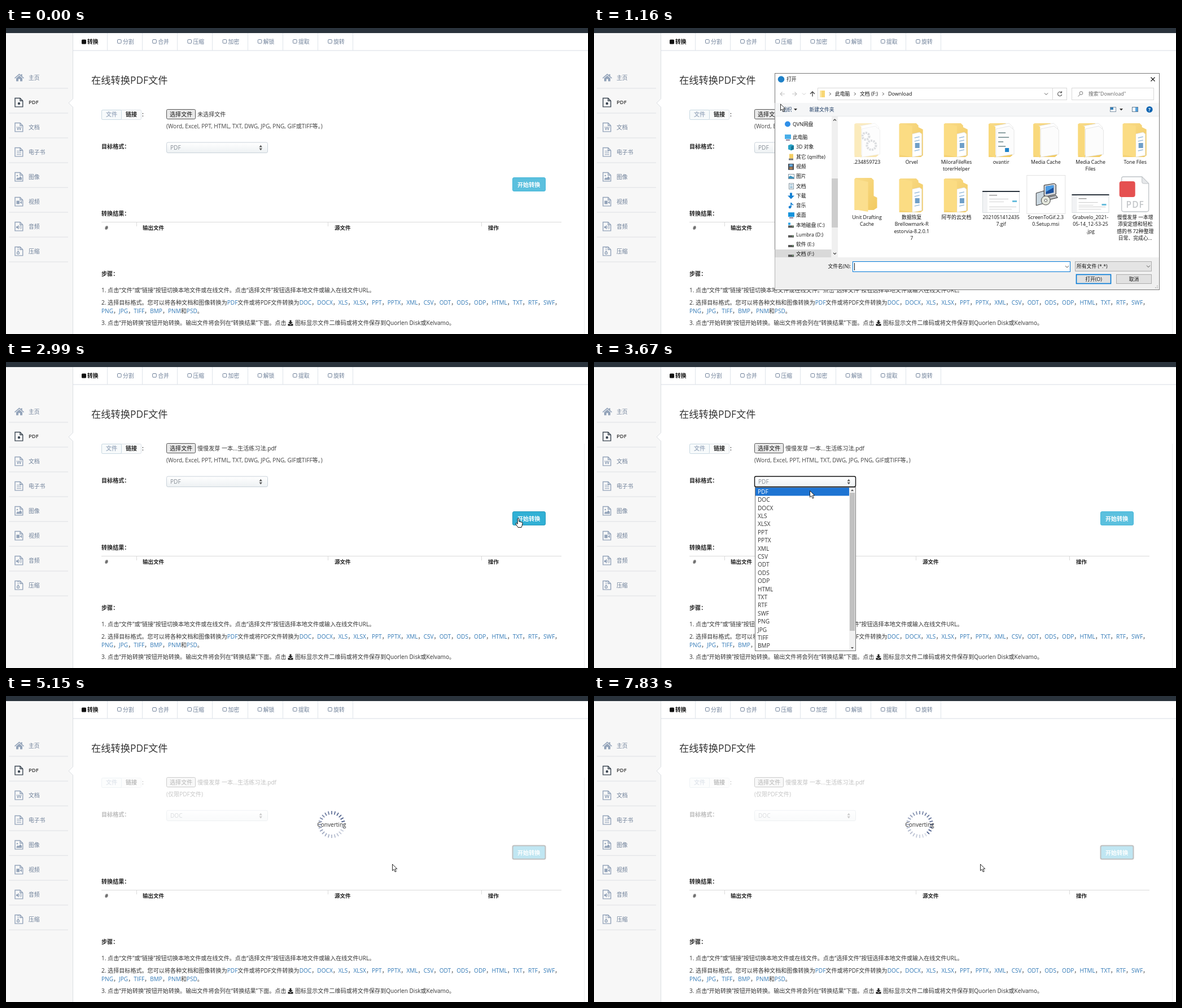
An HTML page for the animation above (7.99 s loop, 1031 by 543 pixels).

```html
<!DOCTYPE html>
<html lang="zh-CN">
<head>
<meta charset="utf-8">
<title>在线转换PDF文件</title>
<style>
html, body { margin: 0; width: 100%; height: 100%; overflow: hidden; background: #fff; }
svg { display: block; width: 1031px; height: 543px; }
text { font-family: 'Open Sans', 'Noto Sans CJK SC', 'Noto Sans CJK', sans-serif; white-space: pre; }
</style>
</head>
<body>
<svg id="stage" viewBox="0 0 1031 543"></svg>
<script>
const BODY = 10.08, SMALL = 8.8;
const stage = document.getElementById('stage');

const attrs = o => Object.entries(o).map(([k, v]) => ` ${k}="${v}"`).join('');
const rect = (x, y, w, h, fill, o = {}) =>
  `<rect x="${x}" y="${y}" width="${w}" height="${h}" fill="${fill}"${attrs(o)}/>`;
const box = (x, y, w, h, fill, stroke, o = {}) => rect(x + .5, y + .5, w - 1, h - 1, fill, { stroke, ...o });
const path = (d, fill, o = {}) => `<path d="${d}" fill="${fill}"${attrs(o)}/>`;
const line = (d, stroke, width = 1, o = {}) => path(d, 'none', { stroke, 'stroke-width': width, ...o });
const circle = (x, y, r, fill, o = {}) => `<circle cx="${x}" cy="${y}" r="${r}" fill="${fill}"${attrs(o)}/>`;
const group = (body, o = {}) => `<g${attrs(o)}>${body}</g>`;
const at = (x, y, body) => group(body, { transform: `translate(${x} ${y})` });
// y is the optical middle of the line
const text = (x, y, s, fill = '#333', size = BODY, o = {}) =>
  `<text x="${x}" y="${y + size * .36}" font-size="${size}" fill="${fill}"${attrs(o)}>${s}</text>`;
const bold = (x, y, s, fill = '#222', size = BODY) => text(x, y, s, fill, size, { 'font-weight': 600 });
const small = (x, y, s, fill = '#111', o = {}) => text(x, y, s, fill, SMALL, o);
const middle = { 'text-anchor': 'middle' };
const chevron = (x, y, c = '#555') => line(`M${x - 3} ${y - 1.5}l3 3 3-3`, c);
const caret = (x, y) => path(`M${x - 3} ${y - 1.5}h6l-3 3.5z`, '#333');

const book = { label: ['慢慢发芽 一本增', '添安定感和轻松', '感的书 72种整理', '日常、完成心...'],
  file: '慢慢发芽 一本增添安定感和轻松感的书 72种整理日常、完成心愿的生活练习法.pdf',
  short: '慢慢发芽 一本...生活练习法.pdf' };
const formats = 'DOC DOCX XLS XLSX PPT PPTX XML CSV ODT ODS ODP HTML TXT RTF SWF PNG JPG TIFF BMP PNM PSD'.split(' ');

function sidebar() {
  const glyphs = [
    '', c => circle(23, 2, 2.2, c),
    c => text(23, 1.5, 'W', c, 9, { ...middle, 'font-weight': 700 }),
    c => line('M19 -1.5h8M19 1.5h8M19 4.5h8', c, 1.2),
    c => path('M18.5 5.5v-2l2.5-2.5 1.5 1.5 3-3.5 2.5 3v3.5z', c) + circle(20, -2, 1.3, c),
    c => rect(18.5, -1.5, 5.5, 6, c) + path('M24.5 1.5l3.5-3v6z', c),
    c => path('M18 0h2l2.5-2.5v8L20 3h-2z', c) + line('M24 -.5q1.5 2 0 4M26 -2q2.5 3.5 0 7', c),
    c => line('M21.5 -7v8', c, 2, { 'stroke-dasharray': '1.5 1.5' }) + circle(21.5, 3.2, 2, 'none', { stroke: c, 'stroke-width': 1.4 })
  ];
  const names = ['主页', 'PDF', '文档', '电子书', '图像', '视频', '音频', '压缩'];
  const items = names.map((name, i) => {
    const active = i === 1, c = active ? '#3b4652' : '#94a4ba';
    const icon = i
      ? line('M16 -7.5h9l4.7 4.7v10.7H16zM25 -7.5v4.7h4.7', c, 1.4) + glyphs[i](c)
      : path('M15 .5L23.5 -7l3 2.7V-6h2.2v3.7L32 .5l-1 1.2-7.5-6.5L16 1.7z', c) + path('M18 1.2l5.5-4.7 5.5 4.7V6.5h-4V2.5h-3v4h-4z', c);
    return at(0, 88 + 44 * i, icon +
      (active ? bold(40, 0, name, '#333', 9.4) : text(40, 0, name, '#6d7f98', 9.8)) +
      rect(5, 18.5, 105, 1, '#dde0e4'));
  });
  return rect(0, 9, 118, 534, '#f7f7f7') + rect(118, 9, 1, 534, '#dcdfe3') + items.join('') +
    path('M120 124.5L111 133l9 8.5z', '#fff') + line('M118.5 125.5L111 133l7.5 7.5', '#dcdfe3');
}

function tabs() {
  const names = ['转换', '分割', '合并', '压缩', '加密', '解锁', '提取', '旋转'];
  return rect(119, 39.5, 912, 1, '#d8dee5') + names.map((name, i) => {
    const x = i ? 197 + 62.2 * (i - 1) : 134;
    const icon = i ? rect(x + .5, 20.5, 6.6, 6.6, 'none', { rx: 1.3, stroke: '#6d7f98' }) : rect(x, 20.5, 8, 8, '#111', { rx: 1.5 });
    return icon + (i ? text(x + 10, 24.5, name, '#6d7f98', 9.8) : bold(x + 10, 24.5, name, '#111', 9.8)) +
      rect(Math.round(179 + 62.15 * i), 9, 1, 31, '#dfe4ea');
  }).join('');
}

function form() {
  return box(169, 145, 71, 18, '#fafbfb', '#dce2e8', { rx: 2 }) +
    box(169, 145, 36, 18, '#f7fafb', '#c8d8e2', { rx: 2 }) +
    bold(177, 153.5, '文件', '#a3b1c4') + bold(212, 153.5, '链接') + bold(241, 153.5, ':') +
    box(284, 144, 52, 18, '#e9e9e9', '#555', { rx: 2 }) + text(290, 153.5, '选择文件', '#111') +
    text(339, 153.5, '', '#333', BODY, { id: 'chosen' }) + text(284, 174, '', '#444', BODY, { id: 'hint' }) +
    bold(169, 210, '目标格式：') +
    rect(284.5, 203, 179, 18.5, 'url(#soft)', { rx: 2.5, id: 'select' }) +
    text(291, 212.5, 'PDF', '#888f97', BODY, { id: 'format' }) +
    path('M448.5 211.5l2.7-3.8 2.7 3.8zM448.5 213.5l2.7 3.8 2.7-3.8z', '#555') +
    rect(897.5, 265.5, 58, 24, '#5bc0de', { rx: 2.5, id: 'convert' }) + bold(906, 278, '开始转换', '#fff');
}

function results() {
  return rect(1024, 145, 1, 398, '#eceef0') + bold(169, 329.5, '转换结果：') + rect(169, 344, 815, 1, '#dadada') +
    [231, 570, 842].map(x => rect(x, 345, 1, 7, '#dadada')).join('') +
    [[175, '#'], [242, '输出文件'], [582, '源文件'], [854, '操作']].map(([x, s]) => bold(x, 355, s, '#222', 9.5)).join('') +
    bold(169, 436, '步骤：');
}

function steps() {
  const link = s => `<tspan fill="#337ab7">${s}</tspan>`;
  const list = names => names.map(link).join('，');
  return text(169, 465.7, '1. 点击“文件”或“链接”按钮切换本地文件或在线文件。点击“选择文件”按钮选择本地文件或输入在线文件URL。') +
    text(169, 487.7, `2. 选择目标格式。您可以将各种文档和图像转换为${link('PDF')}文件或将PDF文件转换为${list(formats.slice(0, 15))}，`) +
    text(169, 502, `${list(formats.slice(15, -1))}和${link('PSD')}。`) +
    text(169, 523.7, '3. 点击“开始转换”按钮开始转换。输出文件将会列在“转换结果”下面。点击') +
    path('M502.5 518.5h3v3.5h2.5l-4 4-4-4h2.5zM499.5 525h2.5l2 2 2-2h2.5v3.5h-9z', '#222') +
    text(512, 523.7, '图标显示文件二维码或将文件保存到Quorlen Disk或Kelvamo。');
}

function folder(kind) {
  const edge = { stroke: '#dcdcdc', 'stroke-width': .7 };
  const back = path('M-22 3l2-2h28l4 4v3l8 4v46l-4 3h-38z', 'url(#gold)');
  const cover = path('M-22 2L1 6v55l-23-4z', '#fbdc83');
  if (kind === 'plain') return path('M-22 2l2-2h28l4 4v28l6 3v18l-6 4h-34z', 'url(#gold)') + path('M-22 2l24 5v53l-24-4z', '#fbdf8e');
  if (kind === 'blue') return back +
    path('M1 20l13-3 4 3v38L1 61z', '#fff', edge) + line('M5 27l9-2M5 33l9-2M5 50l9-2', '#9dbfdd', 1.5) +
    rect(6, 36, 8, 9, '#6f9fc8') + cover;
  const page = kind === 'gear'
    ? [[-2, 24, 6], [8, 40, 8]].map(([x, y, r]) => circle(x, y, r, 'none', { stroke: '#b9bdc2', 'stroke-width': 4, 'stroke-dasharray': '3 1.5' })).join('')
    : kind === 'code' ? line('M-5 18h13M-5 26h19M-5 34h9M-5 42h13', '#8fa3a5', 1.8) + rect(7, 45, 7, 7, '#1f83c9') : '';
  return back + path('M-13 6L14 1l7 7v44l-34 6z', '#fff', edge) + path('M-9 11l24-5 8 7v43l-32 5z', '#fcfcfc', edge) +
    page + path('M-22 2l12 5v55l-12-5z', '#f9d97c');
}

const thumb = (h, top) => at(-33, top, box(0, 0, 66, h, '#fff', '#d5dadd') + rect(0, 0, 66, 2, '#2b343d') +
  rect(1, 2, 8, h - 3, '#f1f2f4') + rect(12, 7, 14, 1.5, '#999') + rect(12, 14, 34, 1, '#ccc') +
  rect(12, 19, 26, 1, '#d5d5d5') + rect(53, 17, 8, 3, '#69bddc') + rect(12, h - 11, 48, 1, '#ccc') + rect(12, h - 7, 40, 1, '#d5d5d5'));

const installer = box(-34, -5, 69, 69, '#fff', '#e1e1e1') +
  path('M-3 13l18-3 3 2v17l-18 4-3-2z', '#d4d6da', { stroke: '#222' }) + path('M0 15l14-2v13L0 29z', '#1a4f9c') +
  path('M0 25l14-8v-4L0 15z', '#4d9ee6') + path('M-2 35l20-4 3 4-20 5z', '#bfc2c6', { stroke: '#222' }) +
  path('M-17 27l14-4v22l-14 4z', '#c9d6df', { stroke: '#333' }) + circle(0, 40, 8, '#e3e6dc', { stroke: '#444' }) +
  circle(0, 40, 2.3, '#fff', { stroke: '#555' });

const pdfPage = path('M-24 1q0-3 3-3h33l12 12v46q0 4-4 4h-40q-4 0-4-4z', '#fff', { stroke: '#bfc3c7', 'stroke-width': 1.3 }) +
  path('M12-2v9q0 3 3 3h9z', '#e6e8ea', { stroke: '#bfc3c7' }) + rect(-28, 6, 28, 28, '#e55050', { rx: 4 }) +
  text(0, 47, 'PDF', '#c3c6c9', 15.5, { ...middle, 'font-weight': 600, 'letter-spacing': 1 });

function files() {
  const entries = [
    [group(folder('gear'), { opacity: .5 }), '.234859723'], [folder('blue'), 'Orvel'],
    [folder('blue'), 'MiloraFileRes', 'torerHelper'], [folder('code'), 'ovantir'],
    [folder('doc'), 'Media Cache'], [folder('doc'), 'Media Cache', 'Files'], [folder('blue'), 'Tone Files'],
    [folder('plain'), 'Unit Drafting', 'Cache'], [folder('blue'), '数据恢复', 'Brellowmark-R', 'estorvia-8.2.0.1', '7'],
    [folder('blue'), '阿岑的云文档'], [thumb(39, 23), '2021051412435', '7.gif'],
    [installer, 'ScreenToGif.2.3', '0.Setup.msi'], [thumb(33, 29), 'Grabvelo_2021-', '05-14_12-53-25', '.jpg'],
    [pdfPage, ...book.label]
  ];
  return box(922, 260, 75, 121, '#cce8ff', '#99d1ff', { id: 'picked' }) + entries.map(([icon, ...lines], i) =>
    at(483.5 + 79.2 * (i % 7), i < 7 ? 168 : 266, icon +
      lines.map((s, n) => small(0, 70 + 12.2 * n, s, '#111', middle)).join(''))).join('');
}

function tree() {
  const drive = path('M-5 1h10v4h-10z', '#555') + rect(2, 2, 2, 1, '#7fe07f');
  const screen = c => rect(-5, -5, 11, 8, c) + rect(-3, 4, 7, 1.5, '#657');
  const sheet = c => box(-4, -5, 9, 11, '#fff', '#7f929f') + line('M-2 -2h5M-2 1h5M-2 3h5', c);
  const rows = [
    ['QVN网盘', circle(0, 0, 5, '#2f8fe8')], ['此电脑', screen('#49aee8')],
    ['3D 对象', path('M-5 -3l5-2 5 2v7l-5 2-5-2z', '#2ba4c9') + path('M0 -1l5-2v7l-5 2z', '#147797')],
    ['其它 (qmlfte)', rect(-3, -5, 7, 8, '#f4ce62') + rect(-4, 3, 8, 3, '#777')],
    ['视频', rect(-5, -5, 10, 11, '#454b55') + rect(-3, -4, 6, 4, '#62a8dc') + rect(-3, 1, 6, 4, '#a67c52')],
    ['图片', box(-5, -4, 11, 9, '#fff', '#8293a0') + path('M-4 4v-3l3-2 6 3v2z', '#3b92bd')],
    ['文档', sheet('#5292b8')], ['下载', path('M-2 -5h4v5h4l-6 6-6-6h4z', '#1680d2')],
    ['音乐', line('M0 3v-8q1 3 4 4', '#1680d2', 1.6) + circle(-2, 3, 2.3, '#1680d2')], ['桌面', screen('#1593dc')],
    ['本地磁盘 (C:)', drive + rect(-5, -4, 4, 4, '#35a7e7')], ['Lumbra (D:)', drive], ['软件 (E:)', drive], ['文档 (F:)', drive]
  ];
  return rect(320.5, 393, 100, 14, '#d9d9d9') + rows.map(([name, icon], i) => {
    const y = i ? 194 + 17.27 * (i - 1) : 170.5, x = i < 2 ? 343 : 349;
    return at(x, y, icon) + small(x + 9, y, name);
  }).join('') + rect(421, 157, 11, 250, '#f0f0f0') + rect(421, 267, 11, 87, '#cdcdcd') +
    line('M424 164.5l2.5-2.5 2.5 2.5M424 399l2.5 2.5 2.5-2.5', '#444', 1.2);
}

function dialog() {
  const sep = x => line(`M${x - 1} 114.5l2.5 2.5-2.5 2.5`, '#444');
  const header = circle(331.5, 91, 5.8, '#1e80c7') + small(341, 91, '打开') + line('M986.5 87.5l7 7m0-7l-7 7', '#111', 1.1) +
    line('M338 117h-8m3.5-3.5L330 117l3.5 3.5M351 117h8m-3.5-3.5l3.5 3.5-3.5 3.5', '#c5c5c5', 1.2) + chevron(372, 117, '#ccc') +
    line('M387 121.5v-8.5m-4 4l4-4 4 4', '#444', 1.3) +
    box(396, 106, 442, 22, '#fff', '#d9d9d9') + rect(812, 106, 1, 22, '#d9d9d9') +
    rect(400, 111, 9, 12, '#f8d775') + rect(400, 111, 3, 12, '#fbe7a6') +
    sep(418) + small(427, 117, '此电脑') + sep(462) + small(471, 117, '文档 (F:)') + sep(512) + text(521, 117, 'Download', '#111', 9) +
    group(sep(573), { id: 'trail' }) + chevron(801, 117) + line('M828 114.5a3.7 3.7 0 1 0 .8 3.5M828.5 112v3h-3', '#555', 1.1) +
    box(846, 106, 146, 22, '#fff', '#d9d9d9') + circle(863, 115.5, 2.8, 'none', { stroke: '#777' }) + line('M861 118l-3.5 3.5', '#777') +
    small(876, 117, '搜索"Download"', '#666');
  const toolbar = rect(320.5, 133, 680, 23, '#f5f6f7') + rect(320.5, 156, 680, 1, '#e6e8ea') +
    small(333, 144.5, '组织', '#1b3a63') + caret(357, 144.5) + small(381.5, 144.5, '新建文件夹', '#1b3a63') +
    box(914, 140, 11, 9, '#fff', '#8296a8') + rect(915, 141, 5, 4, '#347fb8') + caret(934, 144.5) +
    box(953, 140, 11, 9, '#fff', '#5f7d96') + rect(959, 141, 4, 7, '#53a2df') +
    circle(984, 144.5, 5.6, '#0863b1') + text(984, 144.5, '?', '#fff', 9, { ...middle, 'font-weight': 700 });
  const footer = rect(320.5, 407, 680, 57, '#f0f0f0') + small(455, 423, '文件名(N):', '#111', { 'text-anchor': 'end' }) +
    box(458, 414, 386, 19, '#fff', '#7a7a7a', { id: 'field' }) + small(461, 423.5, '', '#111', { id: 'filename' }) +
    rect(461, 417, 1, 13, '#111', { id: 'caret' }) + chevron(838, 423.5) +
    box(852, 414, 136, 18, '#e4e4e4', '#adadad') + small(855, 423, '所有文件 (*.*)') + chevron(982, 423) +
    box(854, 437, 62, 17, '#e1e1e1', '#0078d7', { id: 'open' }) + small(885, 445.5, '打开(O)', '#111', middle) +
    box(925, 437, 63, 17, '#e1e1e1', '#adadad') + small(956.5, 445.5, '取消', '#111', middle) +
    [[997, 457], [997, 460], [994, 460]].map(([x, y]) => rect(x, y, 1.5, 1.5, '#aaa')).join('');
  return box(320, 80, 682, 385, '#fff', '#777') + header + toolbar + tree() + files() + footer;
}

const popup = () => box(285, 222, 179, 291, '#fff', '#777') +
  rect(286, 223, 166, 14.4, '#1e74d2', { id: 'hover' }) +
  ['PDF', ...formats].slice(0, 20).map((s, i) => text(290, 230.2 + 14.4 * i, s, '#333', BODY, { class: 'option' })).join('') +
  rect(452, 223, 11, 289, '#f1f1f1') + rect(453, 232, 9, 245, '#c1c1c1') +
  path('M455 229l2.5-3 2.5 3zM455 506l2.5 3 2.5-3z', '#555');

const TICKS = 24;
const spinner = () => at(577, 228, Array.from({ length: TICKS }, (_, i) =>
  line('M0 -24v6', '#3c5080', 1.7, { class: 'tick', transform: `rotate(${i * 360 / TICKS})` })).join('')) +
  text(577, 228.5, 'Converting', '#333', BODY, middle);

const pointer = path('M0 0v11.5l2.7-2.5 2 4.6 2-.9-2-4.4h3.7z', '#fff', { stroke: '#111', 'stroke-width': .9, id: 'arrow' }) +
  path('M-1.3 1q1.3-1.6 2.6 0v5l5.2 1.4q1.5.6 1 2.6l-1 4-1 2.5h-6l-4-6q-.3-2 1.5-1.6l1.7 1.6z', '#fff',
    { stroke: '#111', 'stroke-width': 1, id: 'hand' });

stage.innerHTML = `<defs>
  <linearGradient id="soft" x2="0" y2="1"><stop stop-color="#fff"/><stop offset="1" stop-color="#edf1f3"/></linearGradient>
  <linearGradient id="gold" x2="1" y2="1"><stop stop-color="#f9dc8b"/><stop offset="1" stop-color="#f2ca60"/></linearGradient>
</defs>` + rect(0, 0, 1031, 543, '#fff') + rect(0, 0, 1031, 9, '#2a333c') + sidebar() + tabs() +
  text(151, 93, '在线转换PDF文件', '#333', 17.28) + group(form(), { id: 'form' }) + results() + steps() +
  group(spinner(), { id: 'spinner' }) + group(popup(), { id: 'popup' }) + group(dialog(), { id: 'dialog' }) + group(pointer, { id: 'cursor' });

const $ = id => document.getElementById(id);
const show = (id, on) => $(id).setAttribute('display', on ? 'inline' : 'none');
const set = (id, o) => { for (const k in o) $(id).setAttribute(k, o[k]); };
const ticks = [...document.querySelectorAll('.tick')], options = [...document.querySelectorAll('.option')];

const LOOP = 7990, STEPS = 48;
const trail = [[1, 322, 166], [2, 312, 154], [4, 312, 154], [7, 330.5, 135], [10, 955, 300], [11, 955, 305],
  [12, 907.5, 442], [14, 907.5, 440], [17, 908, 285], [18, 907.5, 277], [19, 903, 274], [21, 445, 212],
  [23, 320, 245], [24, 320, 245], [26, 914.5, 282], [27, 914.5, 282], [28, 691, 297], [29, 684.5, 298.5]];

function cursorAt(step) {
  const n = trail.findIndex(k => k[0] >= step);
  if (n <= 0) return trail[n ? trail.length - 1 : 0].slice(1);
  const [s0, x0, y0] = trail[n - 1], [s1, x1, y1] = trail[n], u = (step - s0) / (s1 - s0);
  return [x0 + (x1 - x0) * u, y0 + (y1 - y0) * u];
}

function draw(ms) {
  const step = Math.min(STEPS - 1, Math.floor((ms % LOOP + 20) * STEPS / LOOP));
  const chosen = step >= 14, converted = step >= 24, busy = step >= 28, picked = step >= 11;
  const [x, y] = cursorAt(step);
  const overButton = chosen && !busy && x > 897 && x < 956 && y > 265 && y < 290;

  show('cursor', step >= 1);
  set('cursor', { transform: `translate(${x} ${y})` });
  show('hand', overButton);
  show('arrow', !overButton);

  show('dialog', step >= 4 && !chosen);
  show('picked', picked);
  show('trail', picked);
  show('caret', !picked);
  set('field', { stroke: picked ? '#7a7a7a' : '#0078d7' });
  set('open', { fill: step >= 12 ? '#e5f1fb' : '#e1e1e1', 'stroke-width': step >= 12 ? 1 : 1.6 });
  $('filename').textContent = picked ? book.file : '';

  $('chosen').textContent = chosen ? book.short : '未选择文件';
  $('hint').textContent = converted ? '(仅限PDF文件)' : '(Word, Excel, PPT, HTML, TXT, DWG, JPG, PNG, GIF或TIFF等。)';
  $('format').textContent = converted ? 'DOC' : 'PDF';
  const focused = step >= 21 && !busy;
  set('select', { stroke: focused ? '#111' : '#c9d2da', 'stroke-width': focused ? 1.4 : 1 });
  set('convert', { fill: overButton || busy ? '#31b0d5' : '#5bc0de',
    stroke: busy ? '#333' : overButton ? '#269abc' : '#46b8da', 'stroke-width': busy ? 2 : 1 });
  set('form', { opacity: busy ? .3 : 1 });

  show('popup', step >= 21 && !converted);
  const row = step >= 23 ? 1 : 0;
  set('hover', { y: 223 + 14.4 * row });
  options.forEach((o, i) => o.setAttribute('fill', i === row ? '#fff' : '#333'));

  show('spinner', busy);
  const head = Math.floor(1 + (step - 37) * 3.2 + TICKS * 20);
  ticks.forEach((tick, i) => {
    const age = ((head - i) % TICKS + TICKS) % TICKS;
    tick.setAttribute('opacity', 1 - .8 * age / TICKS);
  });
}

const start = performance.now();
(function frame() {
  draw(performance.now() - start);
  requestAnimationFrame(frame);
})();
</script>
</body>
</html>
```
